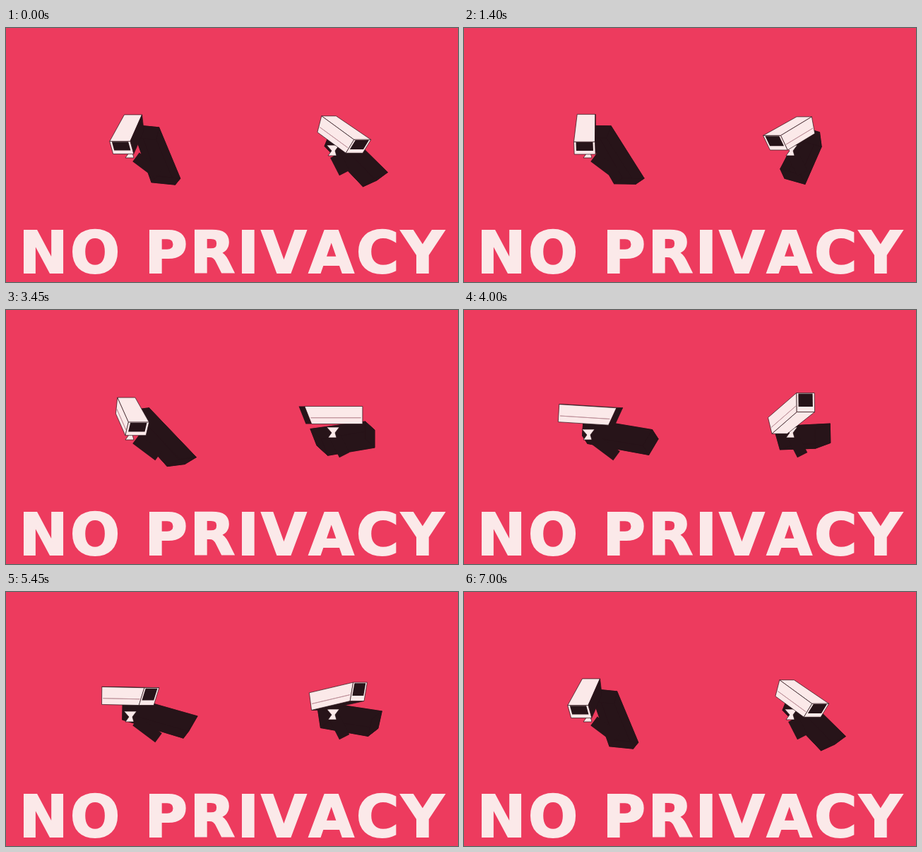
An HTML page with a canvas for the animation above (7.1 s loop, 640 px wide and 360 px high).

```html
<!DOCTYPE html>
<html lang="en">
<head>
<meta charset="utf-8">
<title>No privacy</title>
<style>
  html, body { margin: 0; width: 100%; height: 100%; overflow: hidden; background: #ed3b5e; }
  svg, canvas { position: absolute; left: 0; top: 0; width: 640px; height: 360px; }
  text {
    font: bold 82.5px "DejaVu Sans", sans-serif;
    font-kerning: none;
    letter-spacing: 3.4px;
    fill: #fbe9e9;
    stroke: #fbe9e9;
    stroke-width: 2.2px;
  }
</style>
</head>
<body>
<canvas id="stage" width="640" height="360"></canvas>
<svg viewBox="0 0 640 360"><text x="18.5" y="346.800">NO PRIVACY</text></svg>
<script>
const LOOP = 7100, STEP = 50;
const LIGHT = '#fbe9e9', DARK = '#271419', GREY = '#b98b95';
const LENGTH = 86, WIDTH = 30, HEIGHT = 25;
const TAPER = 0.86, HOOD = 0.12, WALL = 68;
const ctx = document.getElementById('stage').getContext('2d');

// Each pose: pan and tilt in degrees, then the centre on the stage.
// Light is the slope of a ray: shift right and down per unit of depth.
const cameras = [
  {
    light: [0.62, 0.46], mount: [176, 177],
    poses: [[-14, 26, 172, 153], [-2, 27, 172, 153], [13, 24, 178, 153], [82, 0, 179, 148], [0, 2, 171, 147]]
  },
  {
    light: [0.25, 0.49], mount: [463, 174],
    poses: [[37, 23, 478, 153], [-34, 18, 461, 151], [-74, 0, 460, 149], [50, -28, 466, 146], [47, 13, 478, 150]]
  }
];

const settle = u => 1 - (1 - u) ** 3;
const smooth = u => u * u * (3 - 2 * u);
// Start, end and easing of the move from each pose to the next
const moves = [
  [0, 750, settle],
  [1400, 2350, settle],
  [3450, 4600, settle],
  [4850, 6150, smooth],
  [6150, 6700, smooth]
];

function poseAt(poses, t) {
  const i = moves.findLastIndex(m => m[0] <= t);
  const [start, end, ease] = moves[i];
  const k = ease(Math.min(1, (t - start) / (end - start)));
  const next = poses[(i + 1) % poses.length];
  return poses[i].map((v, j) => v + (next[j] - v) * k);
}

const add = (p, q, k = 1) => p.map((v, i) => v + q[i] * k);
const scale = (p, k) => p.map(v => v * k);
const mix = (p, q, k) => p.map((v, i) => v + (q[i] - v) * k);

function area(pts) {
  return pts.reduce((sum, p, i) => {
    const q = pts[(i + 1) % pts.length];
    return sum + p[0] * q[1] - p[1] * q[0];
  }, 0) / 2;
}

function poly(pts, fill, stroke, width = 0.7) {
  ctx.beginPath();
  pts.forEach(p => ctx.lineTo(p[0], p[1]));
  ctx.closePath();
  if (fill) {
    ctx.fillStyle = fill;
    ctx.fill();
  }
  if (stroke) {
    ctx.strokeStyle = stroke;
    ctx.lineWidth = width;
    ctx.stroke();
  }
}

// Faces of the tapered housing in space: x right, y down, z towards the viewer
function housing([pan, tilt, x, y]) {
  const [p, q] = [pan, tilt].map(a => a * Math.PI / 180);
  const [sp, cp, sq, cq] = [Math.sin(p), Math.cos(p), Math.sin(q), Math.cos(q)];
  const ahead = scale([sp * cq, sq, cp * cq], LENGTH);
  const right = [cp, 0, -sp];
  const down = [-sp * sq, cq, -cp * sq];

  const corner = (end, side, level) => {
    const wide = WIDTH / 2 * (end < 0 ? TAPER : 1);
    const reach = end > 0 && level > 0 ? 0.5 - HOOD : end / 2;
    return add(add(add([x, y, 0], ahead, reach), right, side * wide), down, level * HEIGHT / 2);
  };
  const [f, fr, fd, frd, b, br, bd, brd] =
    [1, -1].flatMap(e => [-1, 1].flatMap(l => [-1, 1].map(s => corner(e, s, l))));

  return [
    { quad: [fd, frd, brd, bd], normal: down },
    { quad: [b, br, fr, f], normal: scale(down, -1) },
    { quad: [b, f, fd, bd], normal: scale(right, -1), seam: true },
    { quad: [fr, br, brd, frd], normal: right, seam: true },
    { quad: [br, b, bd, brd], normal: scale(ahead, -1 / LENGTH) },
    { quad: [f, fr, frd, fd], front: true }
  ];
}

// Part of a quad, in fractions of its sides
function patch([a, b, c, d], u0, v0, u1, v1) {
  const at = (u, v) => mix(mix(a, b, u), mix(d, c, u), v);
  return [at(u0, v0), at(u1, v0), at(u1, v1), at(u0, v1)];
}

function drawFront(quad) {
  const size = area(quad);
  if (size < 230) return poly(quad, DARK);
  poly(quad, LIGHT, DARK);
  if (size < 690) return poly(patch(quad, 0.1, 0.04, 0.9, 0.72), DARK);
  poly(patch(quad, 0, 0, 1, 0.16), DARK);
  poly(patch(quad, 0.22, 0.22, 0.8, 0.82), DARK);
  poly(patch(quad, 0.42, 0.42, 0.64, 0.65), null, LIGHT, 1);
}

function drawFace({ quad, normal, seam, front }, [lx, ly]) {
  if (area(quad) <= 0) return;
  if (front) return drawFront(quad);
  const lit = normal[2] - normal[0] * lx - normal[1] * ly > -0.3 || normal[1] < -0.5;
  poly(quad, lit ? LIGHT : DARK, DARK);
  if (seam && lit) poly(patch(quad, 0.03, 0.65, 0.97, 0.65), null, GREY, 0.8);
}

function drawCamera({ light, mount, poses }, t) {
  const faces = housing(poseAt(poses, t));
  const cast = p => add(p.slice(0, 2), light, p[2] + WALL);

  for (const { quad } of faces) poly(quad.map(cast), DARK, DARK);

  // Arm from the bracket to its own shadow
  const far = add(mount, light, WALL * 0.95);
  ctx.lineWidth = 16;
  ctx.beginPath();
  ctx.moveTo(...mix(mount, far, 0.2));
  ctx.lineTo(...far);
  ctx.stroke();

  const bracket = [[-9, -8], [9, -8], [3, 0], [5, 7], [-7, 7], [-2, 0]];
  poly(bracket.map(p => add(mount, p)), LIGHT, DARK);
  for (const face of faces) drawFace(face, light);
}

function draw(now) {
  const t = Math.floor(now % LOOP / STEP) * STEP;
  ctx.clearRect(0, 0, 640, 360);
  for (const camera of cameras) drawCamera(camera, t);
}

const begin = performance.now();
function tick() {
  draw(performance.now() - begin);
  requestAnimationFrame(tick);
}
tick();
</script>
</body>
</html>
```
